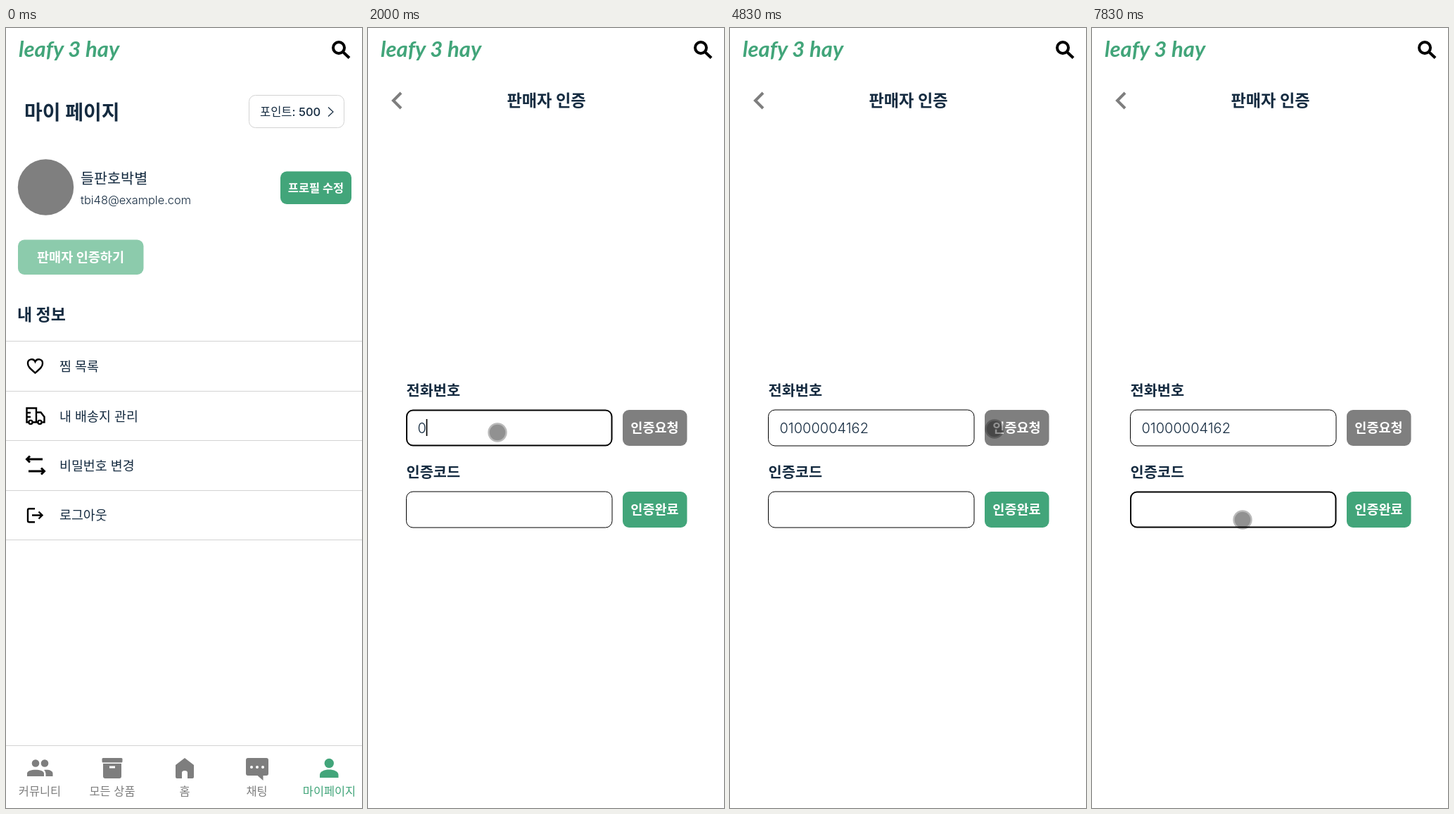
Animation, 506 px wide and 1107 px high, one loop 8 s. Source, as an HTML page:

```html
<!DOCTYPE html>
<html lang="ko">
<head>
<meta charset="utf-8">
<style>
html, body { margin: 0; width: 100%; height: 100%; overflow: hidden; background: #fff; }
svg { display: block; width: 506px; height: 1107px; }
text { font-family: Inter, "Noto Sans CJK KR", "Noto Sans CJK", sans-serif; fill: #152b40; }
.bold { font-weight: 700; }
.mid { font-weight: 500; }
.light { font-weight: 300; }
.c { text-anchor: middle; }
.w { fill: #fff; font-weight: 700; }
.item { font-size: 18.4px; }
.nav text { font-size: 16.4px; fill: #7e7e7e; text-anchor: middle; }
.nav { fill: #7e7e7e; }
.nav .on { fill: #42a57a; font-weight: 500; }
.rule { stroke: #d3d3d3; fill: none; }
.ico { stroke: #000; stroke-width: 2.4; fill: none; }
.green { fill: #42a57a; }
.gray { fill: #7f7f7f; }
.field { fill: #fff; stroke: #000; }
.logo { font: italic 700 31px Lato, sans-serif; fill: #42a57a; }
#panel { fill: #fff; stroke: #d2d2d2; filter: drop-shadow(0 1px 2px rgba(0,0,0,.4)); }
</style>
</head>
<body>
<svg viewBox="0 0 506 1107">
  <text class="logo" x="18" y="41">leafy 3 hay</text>
  <g fill="none" stroke="#000" stroke-width="4">
    <circle cx="473" cy="28" r="8"/>
    <path d="M479 34l9 8.500"/>
  </g>

  <g id="mypage">
    <text class="bold" x="26" y="129.500" font-size="28">마이 페이지</text>
    <rect class="rule" x="345.500" y="95.500" width="135" height="46" rx="9"/>
    <text class="mid" x="361" y="124.500" font-size="16.500">포인트: 500</text>
    <path d="M458 112.500l7 6.500-7 6.500" fill="none" stroke="#152b40" stroke-width="1.200"/>

    <circle class="gray" cx="56.500" cy="226" r="39.700"/>
    <text class="mid" x="106" y="221" font-size="20.700">들판호박별</text>
    <text class="light" x="106" y="250" font-size="16.400">tbi48@example.com</text>
    <rect class="green" x="390" y="203.500" width="101" height="46.500" rx="9"/>
    <text class="w c" x="440.500" y="233" font-size="16.400">프로필 수정</text>
    <rect x="17" y="300.500" width="178.500" height="49.500" rx="9" fill="#8ccbac"/>
    <text class="w c" x="106" y="332" font-size="18.600">판매자 인증하기</text>

    <text class="bold" x="16" y="415" font-size="23">내 정보</text>
    <path class="rule" d="M0 444.500h506M0 515.500h506M0 585.500h506M0 656.500h506M0 726.500h506"/>
    <text class="item" x="76" y="487">찜 목록</text>
    <text class="item" x="76" y="557.500">내 배송지 관리</text>
    <text class="item" x="76" y="628">비밀번호 변경</text>
    <text class="item" x="76" y="698">로그아웃</text>
    <g class="ico">
      <path d="M41.500 489.500C34 483 31 480.500 31 476A5.500 5.500 0 0 1 41.500 473.500A5.500 5.500 0 0 1 52 476C52 480.500 49 483 41.500 489.500Z"/>
      <path d="M32 559.500h-2.500v-20h13.500v20h-5M43 545.500h6.500l5 6.500v7.500h-3M43 559.500h2M30 546h5M30 552h5"/>
      <circle cx="35" cy="559.500" r="2.600"/><circle cx="48" cy="559.500" r="2.600"/>
      <path d="M52 612H30M34 607.500l-4.500 4.500 4.500 4.500M32 629h22M50 624.500l4.500 4.500-4.500 4.500" stroke-width="3"/>
      <path d="M41 682.200h-8q-2 0-2 2v15q0 2 2 2h8M37 691.500h13M46.500 686.500l5 5-5 5"/>
    </g>

    <path class="rule" d="M0 1018.500h506"/>
    <g class="nav">
      <circle cx="42" cy="1043.500" r="5.300"/><circle cx="55" cy="1043.500" r="5.300"/>
      <path d="M30 1062v-4c0-7 24-7 24 0v4zM56.500 1062v-4q0-3-2.500-5c7-1 12.500 1 12.500 5v4z"/>
      <rect x="136.500" y="1036" width="29" height="6.500" rx="1.500"/>
      <path d="M138 1044h26v18q0 3-3 3h-20q-3 0-3-3z"/>
      <path d="M147 1049h8" stroke="#fff" stroke-width="3"/>
      <path d="M241 1046l13-10 13 10v17q0 2-2 2h-7v-8q0-3-4-3t-4 3v8h-7q-2 0-2-2z"/>
      <path d="M344 1036h26q3 0 3 3v19q0 3-3 3h-4.500v7l-8-7H344q-3 0-3-3v-19q0-3 3-3z"/>
      <g fill="#fff"><circle cx="349" cy="1049" r="2"/><circle cx="357" cy="1049" r="2"/><circle cx="365" cy="1049" r="2"/></g>
      <g class="on">
        <circle cx="459.300" cy="1043.500" r="6.700"/>
        <path d="M446 1064v-4c0-10 26.500-10 26.500 0v4z"/>
      </g>
      <text x="48" y="1089">커뮤니티</text>
      <text x="151" y="1089">모든 상품</text>
      <text x="254" y="1089">홈</text>
      <text x="356.500" y="1089">채팅</text>
      <text class="on" x="459.500" y="1089">마이페이지</text>
    </g>
  </g>

  <g id="verify">
    <path d="M47 92l-11 11 11 11" fill="none" stroke="#7e7e7e" stroke-width="4"/>
    <text class="bold c" x="253.500" y="111" font-size="23.200">판매자 인증</text>
    <text class="bold" x="54.500" y="521.500" font-size="20.800">전화번호</text>
    <rect class="field" id="phoneBox"/>
    <text id="hint" x="71" y="574" font-size="18.600" style="fill:#8f9ba8">- 없이 입력해주세요</text>
    <text id="phone" class="light" x="70.500" y="574.500" font-size="20"></text>
    <rect class="gray" x="362" y="542" width="91.500" height="51" rx="9"/>
    <text class="w c" x="407.500" y="574" font-size="18.600">인증요청</text>
    <text class="bold" x="54.500" y="637.500" font-size="20.800">인증코드</text>
    <rect class="field" id="codeBox"/>
    <rect class="green" x="362" y="658" width="91.500" height="51" rx="9"/>
    <text class="w c" x="407.500" y="690" font-size="18.600">인증완료</text>
    <rect id="caret" width="1.700" height="24"/>
  </g>

  <rect id="panel" y="-30" width="420" height="122" rx="14"/>
  <g id="touch">
    <circle r="13.700" fill="#000" fill-opacity=".27"/>
    <circle r="11.300" fill="#000" fill-opacity=".22"/>
  </g>
</svg>
<script>
const el = id => document.getElementById(id);
const show = (id, on) => el(id).style.display = on ? '' : 'none';
const within = (t, a, b) => t >= a && t < b;

function set(id, attrs) {
  for (const [name, value] of Object.entries(attrs)) el(id).setAttribute(name, value);
}

// touch pointer: time, x, y
const path = [
  [100, 424, 1090], [150, 336, 1005], [200, 251, 868], [240, 200, 750], [290, 145, 600],
  [330, 132, 500], [370, 122, 430], [410, 117, 380], [460, 115, 340], [520, 113, 328],
  [960, 113, 328], [1040, 172, 497], [1070, 178, 530], [1100, 184, 558], [1130, 184, 558],
  [1200, 184, 574], [4360, 184, 574], [4430, 243, 572], [4520, 325, 570], [4620, 376, 569],
  [5539, 376, 569], [5540, 377, 574], [5720, 377, 574], [5860, 530, 380], [6150, 530, 240],
  [6200, 480, 303], [6330, 275, 628], [6400, 240, 685], [6480, 214, 700], [6680, 214, 698]
];

// phone field: time, value
const typed = [
  [0, ''], [2000, '0'], [2085, '01'], [2170, '010'], [2255, '0100'], [2340, '01000'],
  [2570, '010000'], [2740, '0100000'], [2910, '01000007'], [3450, '0100000'],
  [3780, '01000004'], [3840, '010000041'], [3900, '0100000416'], [3960, '01000004162']
];

function pointerAt(t) {
  const i = path.findIndex(p => p[0] > t);
  if (i < 0) return path.at(-1).slice(1);
  const [t0, x0, y0] = path[Math.max(i - 1, 0)], [t1, x1, y1] = path[i];
  const k = Math.max(0, (t - t0) / (t1 - t0));
  return [x0 + (x1 - x0) * k, y0 + (y1 - y0) * k];
}

function caretOn(t) {
  return within(t, 1300, 1770) || within(t, 2000, 3310) || within(t, 3720, 4360)
    || within(t, 6600, 7020) || within(t, 7430, 7830);
}

function panelX(t) {
  if (t < 6150) return 130 + 400 * (1 - Math.min(1, Math.max(0, (t - 5760) / 180))) ** 2;
  return 130 + 400 * ((t - 6150) / 150) ** 2;
}

// the border grows inwards on focus
function drawField(id, top, focused) {
  const w = focused ? 2 : 1;
  set(id, { x: 54 + w / 2, y: top + w / 2, width: 293.5 - w, height: 52 - w, rx: 10 - w / 2, 'stroke-width': w });
}

function draw() {
  const t = performance.now() % 8000;
  const inCode = t >= 6600;
  show('mypage', t < 660);
  show('verify', t >= 660);

  const phone = typed.findLast(s => s[0] <= t)[1];
  el('phone').textContent = phone;
  show('hint', !phone);
  drawField('phoneBox', 541.5, within(t, 1300, 4700));
  drawField('codeBox', 657.5, inCode);

  show('caret', caretOn(t));
  const end = phone && !inCode ? el('phone').getComputedTextLength() : 0;
  set('caret', { x: 70.3 + end, y: inCode ? 671.5 : 555 });

  show('panel', within(t, 5760, 6300));
  set('panel', { x: panelX(t) });

  show('touch', t >= 100);
  set('touch', { transform: `translate(${pointerAt(t)})` });
  requestAnimationFrame(draw);
}
draw();
</script>
</body>
</html>
```
